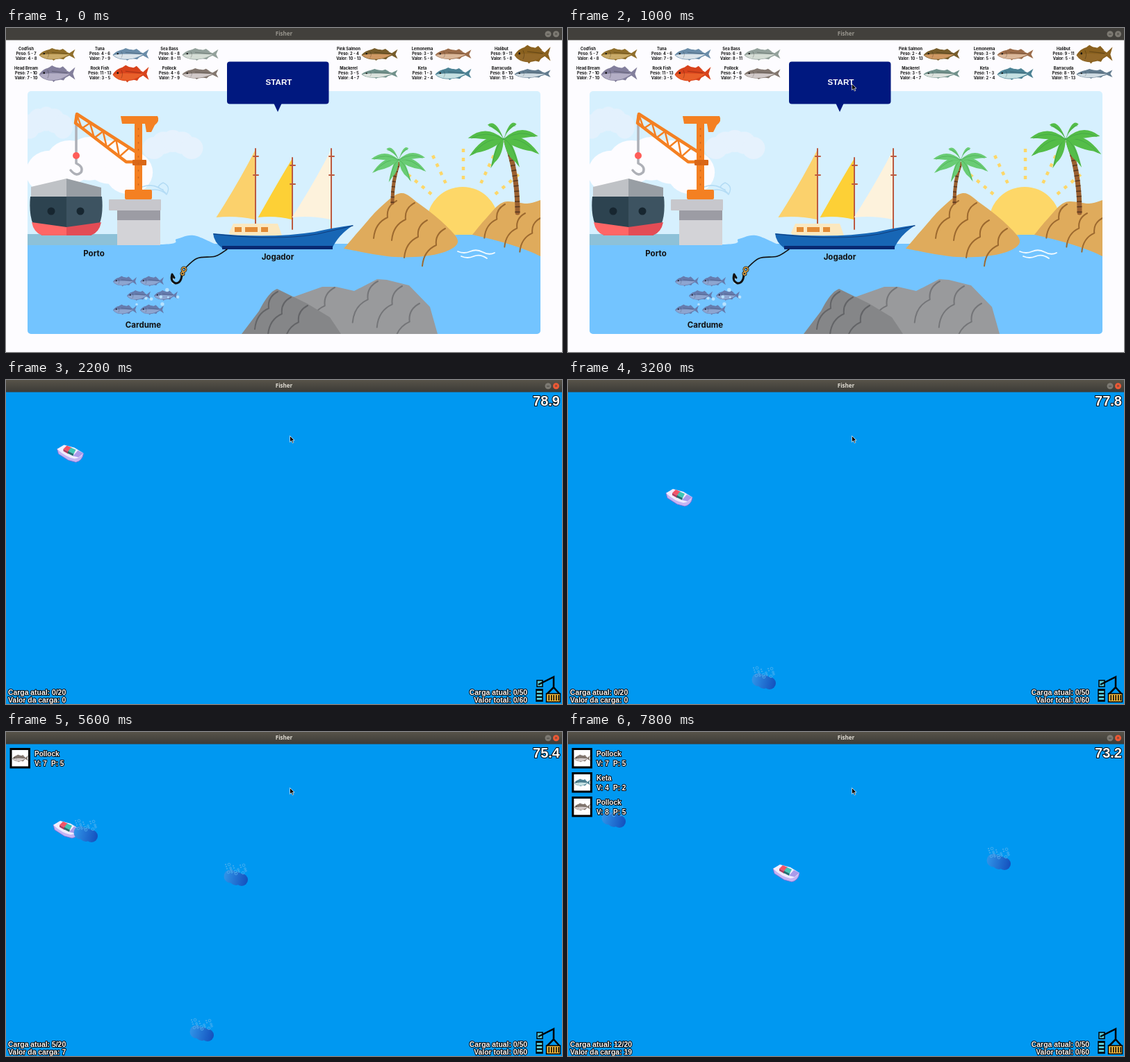
Recreate the animation shown at these times as an HTML page. Size 800 px wide and 467 px high, loop 8 s.

```html
<!DOCTYPE html>
<html lang="pt">
<head>
<meta charset="utf-8">
<title>Fisher</title>
<style>
html, body { margin: 0; width: 100%; height: 100%; overflow: hidden; }
svg { display: block; width: 100vw; height: 100vh; }
text { font-weight: bold; }
.label { font-family: Inter, sans-serif; text-anchor: middle; fill: #111; }
.hud { font: bold 10.4px "Liberation Sans", Arial, sans-serif; fill: #fff; stroke: #000; stroke-width: 2px; stroke-linejoin: round; paint-order: stroke; }
.line { fill: none; stroke-linecap: round; stroke-linejoin: round; }
</style>
</head>
<body>
<svg viewBox="0 0 800 467" preserveAspectRatio="none">
<defs>
  <linearGradient id="barFill" x2="0" y2="1"><stop stop-color="#575349"/><stop offset="1" stop-color="#3c3b37"/></linearGradient>
  <linearGradient id="deep" gradientUnits="userSpaceOnUse" x1="-17" x2="17" y2="8"><stop stop-color="#3094e8"/><stop offset="1" stop-color="#1450bd"/></linearGradient>
  <clipPath id="card"><rect x="31" y="91" width="738" height="350" rx="5"/></clipPath>
  <g id="boat">
    <path fill="#c5b5f3" stroke="#8b68d4" stroke-width=".8" d="M-19-6-17 1-3 10 8 13Q17 11 19 1Z"/>
    <path fill="#f1edff" d="M-19-6-9-12 6-8 19 0Q14 7 6 8-6 6-19-6Z"/>
    <path fill="#aa9bea" d="M4 4 11-4 19 0 12 6Z"/>
    <path fill="#f25467" d="M-10-6-5-11 2-8-2-2Z"/>
    <path fill="#40c7b5" d="M-3-3 1-8 8-5 5 1Z"/>
    <path fill="#b33c60" d="M-10-6-2-2-3 1-10-3Z"/>
    <path fill="#22706f" d="M-3-3 5 1 4 4-4 0Z"/>
  </g>
  <g id="school">
    <g fill="url(#deep)"><circle cx="-8" cy="2" r="9.5"/><circle cy="5" r="10"/><circle cx="8" cy="7" r="9"/></g>
    <g id="bubbles" fill="none" stroke="#55b1ef" stroke-width=".8"></g>
  </g>
</defs>
<g id="menu"></g>
<g id="game">
  <rect width="800" height="467" fill="#0098f1"/>
  <use id="player" href="#boat"/>
  <g id="schools"></g>
  <g id="catches"></g>
  <text id="clock" class="hud" x="797" y="37" text-anchor="end" style="font-size:20px"></text>
  <text id="load" class="hud" x="3" y="453.5"></text>
  <text id="value" class="hud" x="3" y="465"></text>
  <g class="hud" text-anchor="end"><text x="750" y="453.5">Carga atual: 0/50</text><text x="750" y="465">Valor total: 0/60</text></g>
  <g stroke="#000" stroke-width="1.5">
    <path fill="#58c8d6" d="M764 433h8v9h-8zM763 446h9v17h-9z"/>
    <path d="M767.5 446v17" stroke-width="9" stroke-dasharray="2 3"/>
    <path fill="none" stroke-width="2.5" d="M766 439 788 428V443L778 453M788 443 797 453"/>
    <path fill="#f4b93d" d="M777.5 452h20v12h-20z"/>
    <path d="M780.5 458H796" stroke-width="8" stroke-dasharray="1.5 2"/>
  </g>
</g>
<rect id="bar" width="800" height="17.5"/>
<text id="title" x="400" y="11.4" text-anchor="middle" font-family="Open Sans, sans-serif" font-size="8">Fisher</text>
<circle cx="780" cy="8.7" r="4.5" fill="#7d7a73"/><path d="M778 9h4" stroke="#43413c"/>
<circle id="close" cx="791.5" cy="8.7" r="4.5"/><path d="m790 7 3 3m0-3-3 3" stroke="#43413c"/>
<path id="cursor" d="M0 0V9L2.2 7 3.8 10.4 5.3 9.7 3.7 6.5H6.5Z" stroke="#fff" stroke-width=".7"/>
</svg>
<script>
const $ = id => document.getElementById(id);
const repeat = (n, f) => Array.from({ length: n }, (_, i) => f(i)).join('');
const shape = (fill, d) => `<path fill="${fill}" d="${d}"/>`;
const line = (color, width, d, dash = '') => `<path class="line" stroke="${color}" stroke-width="${width}" stroke-dasharray="${dash}" d="${d}"/>`;
const dot = (fill, x, y, r, ry = r) => `<ellipse fill="${fill}" cx="${x}" cy="${y}" rx="${r}" ry="${ry}"/>`;
const box = (fill, x, y, w, h, rx = 0) => `<rect fill="${fill}" x="${x}" y="${y}" width="${w}" height="${h}" rx="${rx}"/>`;
const label = (text, x, y, size) => `<text class="label" x="${x}" y="${y}" font-size="${size}">${text}</text>`;

let seed = 7;
const random = (low, high) => low + (high - low) * ((seed = seed * 16807 % 2147483647) / 2147483647);

// Smooth curve through the points of a string such as "0 0, 10 5".
function smooth(text) {
  const p = text.split(',').map(s => s.trim().split(' ').map(Number));
  return 'M' + p[0] + p.slice(1).map((end, i) => {
    const start = p[i], before = p[i - 1] ?? start, after = p[i + 2] ?? end;
    const c1 = start.map((v, n) => v + (end[n] - before[n]) / 6);
    const c2 = end.map((v, n) => v - (after[n] - start[n]) / 6);
    return `C${c1} ${c2} ${end}`;
  }).join('');
}

// A fish in a 50 by 20 box, head left.
function fish(x, y, w, h, back, belly) {
  return `<g transform="translate(${x} ${y}) scale(${w / 50} ${h / 20})">` +
    shape(back, 'M-14-6-7-10 2-6 8-9 14-4ZM-9 5-5 10 0 6 9 8 13 3Z') +
    shape(back, 'M-25 1C-17-11 3-10 17-2L25-8 22 0 25 7 17 2C3 10-17 11-25 1Z') +
    shape(belly, 'M-24 1C-10-2 5 0 17 0 3 10-17 10-24 1Z') +
    line('#0004', .8, 'M-13-4Q-10 0-13 5M-7-3 14-1') + dot('#111', -18, -1, 1.2) + '</g>';
}

// Name, weight, value, back, belly, height; listed column by column.
const kinds = [
  ['Codfish', '5 - 7', '4 - 8', '#8f6e2b', '#c9aa68', 18],
  ['Head Bream', '7 - 10', '7 - 10', '#837f9c', '#b3aec5', 24],
  ['Tuna', '4 - 6', '7 - 9', '#6a8ca8', '#dbe4ea', 18],
  ['Rock Fish', '11 - 13', '3 - 5', '#d8431c', '#e8602a', 25],
  ['Sea Bass', '6 - 8', '8 - 11', '#93a19b', '#d5ddd5', 18],
  ['Pollock', '4 - 6', '7 - 9', '#83776f', '#d1c9c8', 16],
  ['Pink Salmon', '2 - 4', '10 - 13', '#765c2b', '#ce9863', 18],
  ['Mackerel', '3 - 5', '4 - 7', '#71918b', '#dce2dd', 14],
  ['Lemonema', '3 - 9', '5 - 6', '#9b6c4a', '#dab79a', 17],
  ['Keta', '1 - 3', '2 - 4', '#4c8294', '#c5e0e2', 18],
  ['Halibut', '9 - 11', '5 - 8', '#8a611f', '#93692a', 27],
  ['Barracuda', '8 - 10', '11 - 13', '#637c8f', '#d0dbe2', 14],
];
const columns = [29, 135, 235, 493, 599, 713];
const legend = kinds.map(([name, weight, value, back, belly, height], i) => {
  const x = columns[i >> 1], y = 31.5 + i % 2 * 28;
  return [name, 'Peso: ' + weight, 'Valor: ' + value].map((s, n) => label(s, x, y + n * 7, 5.7)).join('') +
    fish(x + 44.5, y + 6.5, 52, height, back, belly);
}).join('');

const cloud = (fill, x, y, w, h) => repeat(5, i => {
  const u = i / 2 - 1;
  return dot(fill, x + u * w * .33, y + h * (u * u - 1) * .2, w * .2, h * .32);
});

// Eight drooping leaves around the crown.
const palm = (x, y, size, green) => `<g transform="translate(${x} ${y}) scale(${size})">` + repeat(8, i => {
  const a = (i * 45 + 20) * Math.PI / 180, ex = 42 * Math.cos(a), ey = 8 + 26 * Math.sin(a), side = Math.sign(ex);
  return shape(green, `M0 0Q${ex * .5} ${ey * .4 - 17} ${ex} ${ey}L${ex * .83 - side * 2} ${ey * .8}Q${ex * .4 - side * 5} ${ey * .5 + 2} 0 0`) +
    line('#3f9f46', .5, `M0 0Q${ex * .5} ${ey * .4 - 10} ${ex * .9} ${ey * .9}`);
}) + '</g>';
const trunk = (width, d) => line('#9a6030', width, d) + `<path fill="none" stroke="#56371f" stroke-width="${width}" stroke-dasharray="1.5 6" d="${d}"/>`;

const ridges = (color, size, tops) => tops.map(([x, y]) =>
  line(color, 2, `M${x} ${y}q${-15 * size} ${8 * size} ${-13 * size} ${24 * size}q${-18 * size} ${8 * size} ${-20 * size} ${30 * size}`)).join('');

function crane() {
  const strut = i => i % 2 ? `${100 + i * 9} ${138 + i * 6.8}` : `${102 + i * 9.4} ${125 + i * 6}`;
  return line('#aeb0b7', 3.5, 'M101 126V195Q112 200 108 208 101 215 93 205') + dot('#ff5d59', 101, 184, 5) +
    line('#f48022', 2.5, 'M' + [...Array(9).keys()].map(strut).join('L')) +
    line('#f48022', 4.5, 'M186 178 102 124 100 137 173 193H200') +
    box('#f48022', 185, 130, 11, 108) + box('#f48022', 171, 233, 39, 14, 2) + box('#d96717', 182, 190, 20, 8, 1) +
    shape('#f48022', 'M165 127H218Q222 134 214 140L209 150H202L200 138H167Z') +
    line('#c9611a', 1.5, 'M190.5 145V230', '1 9');
}

const harbour =
  cloud('#e3f1fd', 58, 142, 72, 55) + cloud('#e6f2fd', 240, 173, 82, 50) + cloud('#fdfcff', 120, 208, 172, 98) +
  line('#b4dcf5', 1.5, 'M196 229Q215 222 230 238M203 235Q220 229 231 240 238 228 226 223 213 230 226 233') +
  box('#8dc1d8', 31, 297, 132, 16) +
  shape('#bfc2c6', 'M36 246V229L87 217V246Z') + shape('#989ea4', 'M87 217 137 230V246H87Z') +
  shape('#2d4350', 'M35 243H87V299H52Q31 285 35 243Z') + shape('#3d5361', 'M87 243H138Q142 285 122 299H87Z') +
  shape('#ff6666', 'M37 280 87 287V299H52Q40 295 37 280Z') + shape('#e34c55', 'M87 287 137 280Q134 295 122 299H87Z') +
  dot('#172630', 65, 264, 5.5) + dot('#172630', 107, 264, 5.5) +
  box('#d3d3d7', 160, 260, 62, 53) + box('#9c9ca4', 160, 262, 62, 15) + box('#c7c7cc', 148, 247, 75, 16, 1) + crane();

// Mast, top of the sail and its colour.
const sails = [[359, 175, '#fbd16c'], [412, 188, '#fdd036'], [468, 175, '#fdf2dc']].map(([x, top, color]) => {
  const w = (276 - top) * .56;
  return shape(color, `M${x} ${top}Q${x - w * .42} 222 ${x - w} 273Q${x - w / 2} 270 ${x - 1} 276Z`) +
    line('#bb5a40', 2, `M${x} ${top - 1}V290M${x - 3} ${top + 10}h7m-7 27h7`);
}).join('');
const sailboat = sails +
  shape('#fbe8bf', 'M321 295 327 282H391L397 299H323Z') + line('#e28b35', 7, 'M332 290.5H373', '3 16').replace('class="line"', 'fill="none"') +
  box('#e28b35', 329, 287, 48, 7) + box('#fbe8bf', 339, 286, 5, 9) + box('#fbe8bf', 362, 286, 5, 9) +
  shape('#1766b5', 'M298 296Q380 304 444 294 470 288 500 284 478 298 469 318H312Q299 309 298 296Z') +
  line('#0f3d7d', 1.2, 'M299 297Q390 307 448 297 474 291 499 285') + box('#082a73', 311, 314, 159, 5);

const rays = repeat(5, i => `<path transform="rotate(${25 * i - 50} 658 278)" d="M658 218V174" stroke="#fdd769" stroke-width="4.5" stroke-dasharray="5 8"/>`);
const islands = rays + dot('#fdd768', 657, 279, 51, 50) +
  shape('#73c4ff', smooth('31 312, 222 312, 246 304, 270 299, 300 311') + 'H500L650 298H769V441H31Z') +
  shape('#dfab5c', smooth('486 318, 510 290, 538 259, 568 238, 594 253, 630 282, 650 309, 620 326, 560 330, 486 318')) +
  ridges('#9c692f', 1, [[562, 249], [588, 252], [606, 277], [632, 289]]) +
  shape('#dfab5c', smooth('671 298, 692 273, 716 251, 750 253, 769 248') + 'V329Q735 312 671 298Z') +
  ridges('#9c692f', .9, [[718, 254], [747, 267], [769, 274]]) +
  trunk(5, 'M556 252Q556 219 565 195') + trunk(7, 'M736 266Q736 210 720 164') +
  palm(565, 190, 1, '#69cc74') + palm(716, 160, 1.3, '#54bd48') +
  line('#f4fbff', 1.8, 'M650 322q9 4 18 0t18 1 17 1M655 329q9 4 18 0t19 3');

const rocks =
  shape('#999a9c', 'M407 390 455 373 475 373 501 379 534 362 548 363 580 371 610 402 621 441H446Z') +
  ridges('#747578', 1.1, [[473, 374], [535, 365], [570, 372], [595, 397]]) +
  shape('#858688', 'M339 441 364 408Q378 380 390 376L433 397 466 417 482 441Z') +
  ridges('#636467', 1, [[391, 380], [410, 388], [434, 400]]);

const shoal = repeat(6, i => fish(171 + i % 2 * 39 + (i >> 1) % 2 * 20, 365 + (i >> 1) * 20.5, 34, 15, '#667cae', '#8da5d0')) +
  repeat(10, () => dot('#b7e2ff', random(188, 252), random(356, 402), random(1.3, 2.8)));
const rings = (color, width) => `<g fill="none" stroke="${color}" stroke-width="${width}"><circle cx="256" cy="348" r="3"/><circle cx="254" cy="354" r="2"/></g>`;
const hook = line('#111', 1.6, smooth('318 319, 301 329, 275 332, 257 347')) +
  line('#111', 3, 'M253 356Q252 368 244 368 236 365 239 355L242 360') + rings('#111', 3) + rings('#e8ac48', 1.3);

$('menu').innerHTML = box('#fdfcff', 0, 0, 800, 467) + legend +
  `<g clip-path="url(#card)">${box('#d6f0fe', 31, 91, 738, 350) + islands + harbour + sailboat + rocks + shoal + hook}</g>` +
  label('Porto', 126.5, 329, 11.5) + label('Jogador', 391, 333.5, 11.5) + label('Cardume', 197.5, 431.5, 11.5) +
  box('#00187f', 318, 48.5, 146.5, 61, 4) + shape('#00187f', 'M385 108H397L391 121Z') +
  '<text x="392.5" y="82" text-anchor="middle" font-family="Liberation Sans, Arial, sans-serif" font-size="11.6" fill="#fff">START</text>';
$('bubbles').innerHTML = repeat(20, i => `<circle cx="${-15 + i * 7 % 31}" cy="${-15 + i * 5 % 14}" r="${.7 + i % 3 * .6}"/>`);

// Time and place of each turn of the boat; span and place of each school; time of each catch.
const route = [[1200, 25, 42], [3200, 160, 169], [4200, 111, 231], [5600, 87, 140], [7800, 314, 203]];
const spots = [[2400, 6000, 282, 430], [4800, 6400, 115, 143], [5200, 7600, 331, 206], [6600, 8000, 66, 122], [7000, 8000, 620, 183]];
const catches = [[3800, 'Pollock', 7, 5], [6400, 'Keta', 4, 2], [7600, 'Pollock', 8, 5]];

function position(t) {
  const i = Math.max(1, route.findIndex(p => p[0] >= t));
  const [a, b] = [route[i - 1], route[i]], k = (t - a[0]) / (b[0] - a[0]);
  return [1, 2].map(n => a[n] + (b[n] - a[n]) * k);
}

function catchRow([, name, value, weight], i) {
  const y = 23 + i * 35, [, , , back, belly] = kinds.find(k => k[0] === name);
  return box('#000', 5.5, y, 29.5, 29.5) + box('#fff', 8.5, y + 3, 23.5, 23.5) + fish(20.5, y + 15, 23, 11, back, belly) +
    `<g class="hud" style="font-size:10px"><text x="41" y="${y + 12}">${name}</text>` +
    `<text x="41" y="${y + 25.5}">V: ${value}</text><text x="65" y="${y + 25.5}">P: ${weight}</text></g>`;
}

function draw(t) {
  const playing = t >= 1200;
  $('menu').style.display = playing ? 'none' : '';
  $('game').style.display = playing ? '' : 'none';
  $('bar').setAttribute('fill', playing ? 'url(#barFill)' : '#42403c');
  $('title').setAttribute('fill', playing ? '#dfdbd2' : '#98958e');
  $('close').setAttribute('fill', playing ? '#ef5935' : '#7d7a73');
  const away = Math.max(0, (1000 - t) / 400) ** 2;
  $('cursor').style.display = t < 600 ? 'none' : '';
  $('cursor').setAttribute('transform', `translate(${408.5 + away * 40} ${80.5 + away * 100})`);
  if (!playing) return;
  $('player').setAttribute('transform', `translate(${position(t)})`);
  $('schools').innerHTML = spots.filter(s => t >= s[0] && t < s[1])
    .map(([, , x, y]) => `<use href="#school" transform="translate(${x} ${y})"/>`).join('');
  const caught = catches.filter(c => t >= c[0]), total = n => caught.reduce((sum, c) => sum + c[n], 0);
  $('catches').innerHTML = caught.map(catchRow).join('');
  $('clock').textContent = (79.88 - (t - 1200) * .001017).toFixed(1);
  $('load').textContent = `Carga atual: ${total(3)}/20`;
  $('value').textContent = `Valor da carga: ${total(2)}`;
}

const STEP = 200, LOOP = 8000;
let start, shown;
function tick(now) {
  start ??= now;
  const t = Math.floor((now - start) % LOOP / STEP) * STEP;
  if (t !== shown) draw(shown = t);
  requestAnimationFrame(tick);
}
draw(0);
requestAnimationFrame(tick);
</script>
</body>
</html>
```
